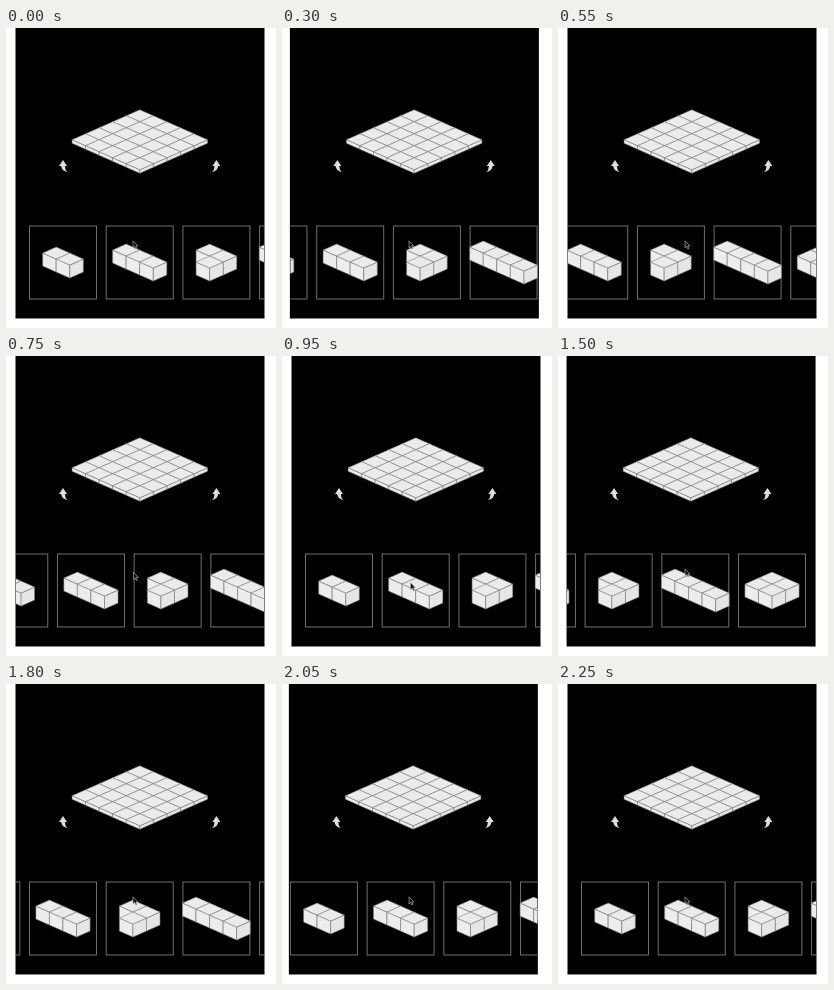
Recreate the animation shown at these times as an HTML page. Size 270 by 300 pixels, loop 2.35 s.

```html
<!DOCTYPE html>
<html lang="en">
<head>
<meta charset="utf-8">
<title>Block picker</title>
<style>
  html, body { margin: 0; width: 100%; height: 100%; overflow: hidden; background: #fff; }
  svg { display: block; width: 270px; height: 300px; }
  .block { stroke: #777; stroke-width: .55; stroke-linejoin: round; }
  .top { fill: #ebebeb; }
  .left { fill: #ededed; }
  .right { fill: #e6e6e6; }
  .card { fill: none; stroke: #707070; }
  .arrow { fill: #ddd; }
  .cursor { fill: #111; stroke: #bbb; stroke-width: .6; }
</style>
</head>
<body>
<svg viewBox="0 0 270 300">
  <defs>
    <clipPath id="panel"><rect x="10" width="248" height="290"/></clipPath>
    <path id="turn" d="M57 132L53 138H55.2Q55.6 142.8 61.5 144Q58.9 142 58.9 138H61Z"/>
  </defs>
  <g id="page">
    <rect x="9.5" width="249" height="290.5"/>
    <g id="floor"></g>
    <use href="#turn" class="arrow"/>
    <use href="#turn" class="arrow" transform="matrix(-1 0 0 1 267.4 0)"/>
    <g clip-path="url(#panel)"><g id="strip"></g></g>
  </g>
  <path id="cursor" class="cursor" d="M0 0V7.2L1.7 5.6L2.9 8.2L4 7.7L2.9 5.2H5Z"/>
</svg>
<script>
  const LOOP = 2350, TICK = 50;
  const DX = 13.55, DY = 6;
  const PITCH = 76.7, SCROLL_END = 2 * PITCH;
  const byId = id => document.getElementById(id);

  function add(parent, tag, attributes) {
    const node = document.createElementNS('http://www.w3.org/2000/svg', tag);
    for (const [key, value] of Object.entries(attributes)) node.setAttribute(key, value);
    return parent.appendChild(node);
  }

  const grid = (cols, rows) =>
    Array.from({ length: cols * rows }, (_, n) => [n % cols, Math.floor(n / cols)]);

  // Draws unit cells in isometric view, back to front, centred on (cx, cy).
  function drawBlock(parent, cells, cx, cy, height) {
    const across = cells.map(([i, j]) => i - j);
    const depth = Math.max(...cells.map(([i, j]) => i + j)) + 2;
    const originX = cx - (Math.min(...across) + Math.max(...across)) / 2 * DX;
    const originY = cy - (depth * DY + height) / 2;
    const group = add(parent, 'g', { class: 'block' });
    const face = (name, d) => add(group, 'path', { class: name, d });

    [...cells].sort((a, b) => a[0] + a[1] - b[0] - b[1]).forEach(([i, j]) => {
      const x = originX + (i - j) * DX, y = originY + (i + j) * DY;
      face('left', `M${x - DX} ${y + DY}l${DX} ${DY}v${height}l${-DX} ${-DY}Z`);
      face('right', `M${x + DX} ${y + DY}l${-DX} ${DY}v${height}l${DX} ${-DY}Z`);
      face('top', `M${x} ${y}l${DX} ${DY}l${-DX} ${DY}l${-DX} ${-DY}Z`);
    });
  }

  const corner = grid(2, 2).filter(([i, j]) => i >= j);
  drawBlock(byId('floor'), grid(5, 5), 133.8, 113.5, 3.5);
  [grid(2, 1), grid(3, 1), corner, grid(4, 1), grid(2, 2)].forEach((cells, n) => {
    const x = 23.5 + n * PITCH;
    add(byId('strip'), 'rect', { class: 'card', x, y: 198, width: 67, height: 73 });
    drawBlock(byId('strip'), cells, x + 33.5, 234.6, 13);
  });

  const progress = (t, start, end) => Math.min(1, Math.max(0, (t - start) / (end - start)));
  const easeOut = u => 1 - (1 - u) ** 1.35;
  const easeInOut = u => u < .5 ? (2 * u) ** 1.45 / 2 : 1 - (2 - 2 * u) ** 1.45 / 2;
  const nudge = (t, start, end) => Math.sin(Math.PI * progress(t, start, end));

  // A short swipe out and back, then a flick to the end and a slow return.
  const scrollAt = t =>
    97.5 * (easeOut(progress(t, 0, 550)) - easeInOut(progress(t, 550, 950))) +
    SCROLL_END * (progress(t, 1150, 1250) - easeInOut(progress(t, 1450, 2150)));

  const pageShiftAt = t =>
    -4.5 * (nudge(t, 0, 340) + nudge(t, 2000, 2250)) - 1.6 * nudge(t, 1450, 1700);

  const cursorDropAt = t => progress(t, 700, 900) - progress(t, 1150, 1250);

  function move(id, x, y = 0) {
    byId(id).setAttribute('transform', `translate(${x} ${y})`);
  }

  const startTime = performance.now();
  function draw() {
    const elapsed = (performance.now() - startTime) % LOOP;
    const t = Math.floor(elapsed / TICK) * TICK;
    const drop = cursorDropAt(t);
    move('page', pageShiftAt(t));
    move('strip', -scrollAt(t));
    move('cursor', 127 + 1.5 * drop, 212.8 + 13.8 * drop);
    requestAnimationFrame(draw);
  }
  draw();
</script>
</body>
</html>
```
